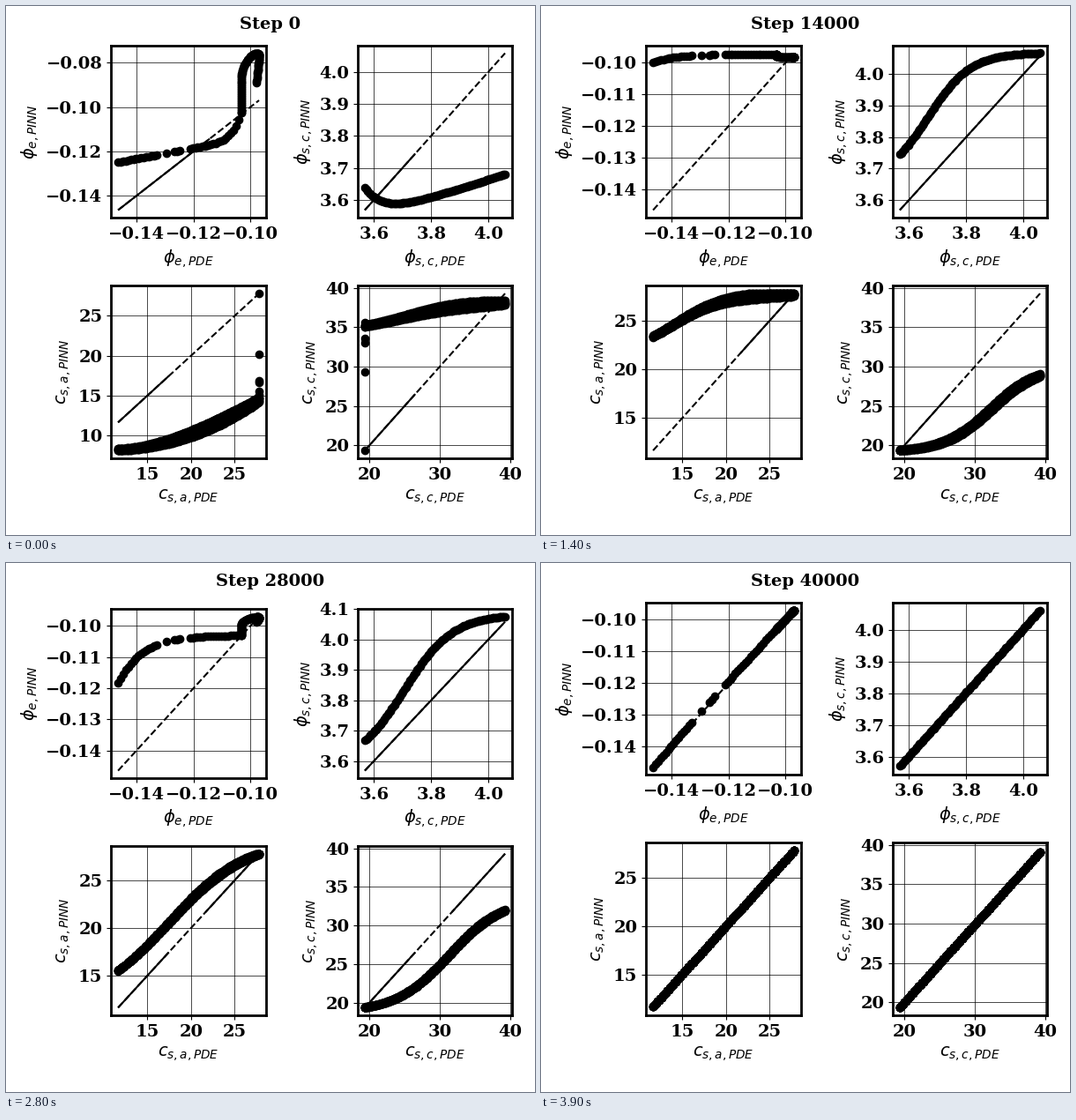
Animation of 600x600 px, one loop 4 s. Source, as a matplotlib script:

```python
import numpy as np
import matplotlib.pyplot as plt
from matplotlib.animation import FuncAnimation
from matplotlib.ticker import MultipleLocator

plt.rcParams.update({
    "font.family": "DejaVu Serif", "font.size": 14, "axes.linewidth": 2,
    "grid.color": "black", "grid.linewidth": 0.5,
})

SIZE = 600
FRAMES = 40
KEYS = [0, 6, 14, 23, 28, 34, 39]


def sigmoid(t, start, end, rate, mid):
    """Logistic curve scaled to run from start to end over t = 0..1."""
    f = lambda v: 1 / (1 + np.exp(-rate * (v - mid)))
    return start + (end - start) * (f(t) - f(0)) / (f(1) - f(0))


def settle(t, start, rise, rate):
    return start + rise * (1 - np.exp(-rate * t))


def hook(q, rise, tail=0):
    return rise * np.sin(np.pi * q / 1.3) + tail * q ** 8


def stage(i):
    """Key interval and blend amount for a frame."""
    k = min(np.searchsorted(KEYS, i, side="right") - 1, len(KEYS) - 2)
    u = (i - KEYS[k]) / (KEYS[k + 1] - KEYS[k])
    if k == 0:
        u = 1 - (1 - u) ** 4
    elif k == 4:
        u = 0.03 * (i - 28) if i <= 30 else 0.85 + 0.05 * (i - 31)
    return k, u


class Panel:
    """One parity plot; solid lists (from, to, stages) of the diagonal."""

    def __init__(self, cell, name, x, curves, error, xstep, ystep, solid=()):
        self.col, self.row = cell
        self.x, self.ystep, self.solid = x, ystep, solid
        # The last two curves lie on the diagonal with a small error.
        self.curves = curves + [x + error, x + 0.4 * error]
        self.lo, self.hi = x.min(), x.max()

        self.ax = ax = fig.add_axes([0.1, 0.1, 0.3, 0.3], label=name)
        ends = [self.lo, self.hi]
        ax.plot(ends, ends, "k--", lw=1.5)
        self.overlay, = ax.plot([], [], "k-", lw=1.5, solid_capstyle="butt")
        self.dots = ax.scatter([], [], c="k", s=36, zorder=3)
        pad = 0.05 * (self.hi - self.lo)
        ax.set_xlim(self.lo - pad, self.hi + pad)
        ax.xaxis.set_major_locator(MultipleLocator(xstep))
        ax.grid(True)
        ax.set_xlabel(f"${name},PDE}}$")
        ax.set_ylabel(f"${name},PINN}}$")

    def update(self, i):
        k, u = stage(i)
        y = (1 - u) * self.curves[k] + u * self.curves[k + 1]
        self.dots.set_offsets(np.column_stack([self.x, y]))
        lo, hi = min(self.lo, y.min()), max(self.hi, y.max())
        pad = 0.05 * (hi - lo)
        self.ax.set_ylim(lo - pad, hi + pad)
        crowded = hi - lo + 2 * pad > 7 * self.ystep
        step = 2 * self.ystep if crowded else self.ystep
        self.ax.yaxis.set_major_locator(MultipleLocator(step))
        for label in self.ax.get_xticklabels() + self.ax.get_yticklabels():
            label.set_fontweight("bold")

    def place(self, i, low):
        left, right = [(119.1, 295), (399, 574)][self.col]
        top = [(44.6, 317.2), (52, 321)][low][self.row]
        bottom = [(240.4, 513.1), (244.3, 513.1)][low][self.row]
        self.ax.set_position([left / SIZE, 1 - bottom / SIZE,
                              (right - left) / SIZE, (bottom - top) / SIZE])
        k = 4 if low else min(stage(i)[0], 4)
        line = []
        for a, b, stages in self.solid:
            if k in stages:
                line += [self.lo + a * (self.hi - self.lo),
                         self.lo + b * (self.hi - self.lo), np.nan]
        self.overlay.set_data(line, line)


def potential_e():
    # A sparse main branch p, then a dense hook q at its upper end.
    p = np.linspace(0, 1, 49)
    for a, b in [(0.325, 0.375), (0.415, 0.447), (0.512, 0.57)]:
        p = p[(p < a) | (p > b)]
    q = np.linspace(0, 1, 80)
    p, q = np.append(p, np.ones(80)), np.append(np.zeros(len(p)), q)
    s = np.clip(2 * q - 0.5, 0, 1)
    curl = np.clip(4 * q - 3, 0, 1)
    x = -146.5 + 43.3 * p + 6.2 * s * s * (3 - 2 * s) - 0.9 * curl ** 2
    curves = [
        -124.9 + 10.3 * p + 12 * p ** 14 + hook(q, 27, -4.4),
        settle(p, -102.8, 5.4, 4) + hook(q, -0.9, -0.2),
        settle(p, -100, 2.6, 6) + hook(q, -0.9, -0.2),
        -105.2 + 3.2 * p + 1.2 * p ** 8 + hook(q, 3.5),
        settle(p, -118.3, 15.3, 5) + hook(q, 5.9, 0.5),
    ]
    error = 1.6e-3 * np.sin(np.pi * (x + 146.5) / 49.5)
    return Panel((0, 0), r"\phi_{e", x / 1000, [c / 1000 for c in curves],
                 error, 0.02, 0.01, [(0, 0.65, {0})])


def potential_s():
    t = np.linspace(0, 1, 100)
    curves = [
        3.54 + 0.14 * t + 0.099 * np.exp(-t / 0.13),
        sigmoid(t, 3.765, 4.061, 7, 0.12),
        sigmoid(t, 3.745, 4.067, 6.6, 0.2),
        sigmoid(t, 3.691, 4.074, 6.3, 0.27),
        sigmoid(t, 3.667, 4.0757, 5.8, 0.28),
    ]
    return Panel((1, 0), r"\phi_{s,c", 3.568 + 0.4905 * t, curves,
                 0.007, 0.2, 0.1, [(0, 0.36, {0}), (0, 1, {2, 3, 4})])


def concentration(cell, name, lo, hi, shapes, spread, limits, first, error,
                  xstep, solid):
    """Band of parallel curves plus the initial points at one end."""
    t, off = np.meshgrid(np.linspace(0, 1, 120), np.linspace(-1, 1, 5))
    t, off = t.ravel(), off.ravel()
    off = off * (0.25 + 0.75 * np.sin(0.85 * np.pi * t ** 1.5)) * spread
    start = 1.0 if name.endswith("a") else 0.0
    t = np.append(t, np.full(len(first), start))
    off = np.append(off, np.zeros(len(first)))
    curves = [np.clip(shape(t) + off * (1 - key / FRAMES), *limits)
              for key, shape in zip(KEYS, shapes)]
    curves[0][-len(first):] = first
    return Panel(cell, name, lo + (hi - lo) * t, curves, error(t),
                 xstep, 5, solid)


fig = plt.figure(figsize=(6, 6), dpi=100, facecolor="white")
title = fig.suptitle("Step 0", fontsize=14, fontweight="bold")

anode = concentration(
    (0, 1), "c_{s,a", 11.65, 27.8,
    [lambda t: 8.25 + 6.25 * t ** 1.75,
     lambda t: sigmoid(t, 21.9, 27.7, 6.5, 0.18),
     lambda t: sigmoid(t, 23.4, 27.7, 5.7, 0.15),
     lambda t: sigmoid(t, 17.25, 27.75, 4, 0.28),
     lambda t: sigmoid(t, 15.55, 27.8, 3.6, 0.36)],
    0.5, (0, 27.8), [27.8, 20.2, 16.9, 16.7, 15.5, 15.1],
    lambda t: 0.25 * (1 - t), 5, [(0, 0.36, {0, 4}), (0.62, 1, {1, 2, 3, 4})])
cathode = concentration(
    (1, 1), "c_{s,c", 19.35, 39.3,
    [lambda t: sigmoid(t, 35.2, 38.1, 4.5, 0.28),
     lambda t: sigmoid(t, 19.4, 27.75, 6.5, 0.72),
     lambda t: sigmoid(t, 19.4, 28.9, 6, 0.65),
     lambda t: sigmoid(t, 19.4, 31.1, 5.5, 0.62),
     lambda t: sigmoid(t, 19.4, 31.95, 5.3, 0.6)],
    0.45, (19.35, 39.3), [19.35, 29.3, 33, 33.6, 35, 35.6],
    lambda t: -0.5 * t, 10, [(0, 0.36, {0, 1, 2, 3, 4}), (0.62, 1, {4})])
phi_s = potential_s()
panels = [potential_e(), phi_s, anode, cathode]


def draw(i):
    title.set_text(f"Step {1000 * (i + (i > 30))}")
    for p in panels:
        p.update(i)
    # A tick label on the upper edge pushes the axes down.
    low = int(phi_s.ax.get_ylim()[1] >= 4.1)
    for p in panels:
        p.place(i, low)
    return []


anim = FuncAnimation(fig, draw, frames=FRAMES, interval=100, repeat=True)
plt.show()
```
